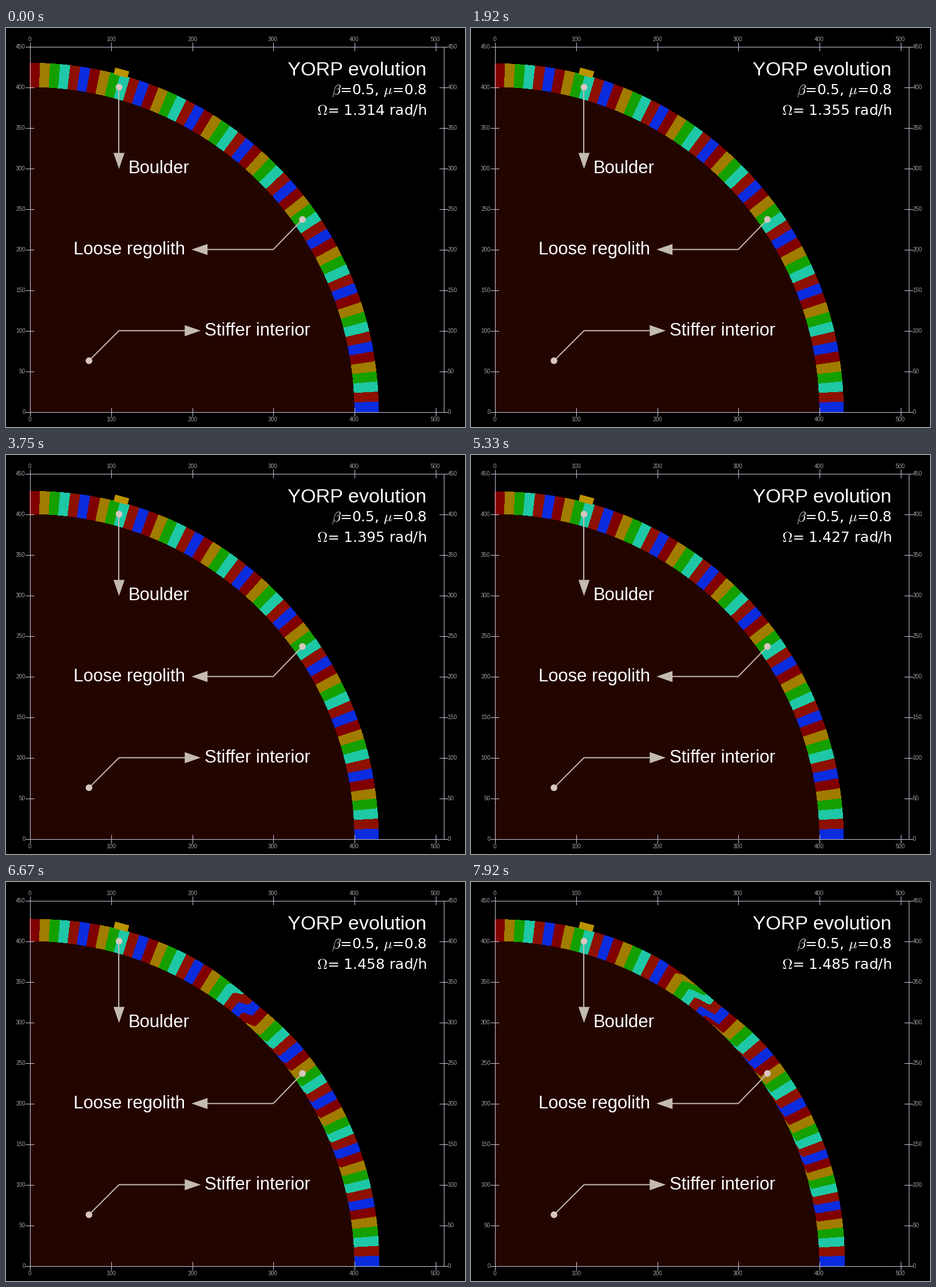
These frames come from a looping animation (802 px wide and 698 px high, 8000 ms). A matplotlib script:

```python
import numpy as np
import matplotlib.pyplot as plt
from matplotlib.animation import FuncAnimation
from matplotlib.collections import LineCollection

W, H, DPI = 802, 698, 64
FRAMES, LOOP = 96, 8000
X0, Y0, KX, KY = 41.5, 671.5, 1.418, 1.42
PT = 72 / DPI                      # points per pixel
R_IN, R_OUT, STRIPES = 400, 430, 54
SLIP_START = 66

PALETTE = np.array([(128, 0, 0), (160, 124, 0), (20, 160, 0),
                    (30, 200, 166), (141, 16, 0), (10, 44, 222)], np.uint8)
CORE = (35, 5, 0)
AXIS = "#c8c8dc"
POINTER = "#c3bbb2"
DOT = "#d8c6c0"

fig = plt.figure(figsize=(W / DPI, H / DPI), dpi=DPI, facecolor="black")
ax = fig.add_axes([0, 0, 1, 1])
ax.axis("off")


def to_px(x, y):
    return X0 + KX * x, Y0 - KY * y


def smooth(x):
    x = np.clip(x, 0, 1)
    return x * x * (3 - 2 * x)


# Polar coordinates of every pixel of the quarter disc
LEFT, RIGHT, TOP, BOTTOM = 41, 662, 50, 672
px, py = np.meshgrid(np.arange(LEFT, RIGHT) + 0.5, np.arange(TOP, BOTTOM) + 0.5)
gx, gy = (px - X0) / KX, (Y0 - py) / KY
radius = np.hypot(gx, gy)
base = np.zeros(radius.shape + (3,), np.uint8)
base[radius < R_IN] = CORE
ring = (radius >= R_IN) & (radius < R_OUT + 4)
r = radius[ring]
theta = np.clip(np.degrees(np.arctan2(gx[ring], gy[ring])), 0, 89.999)


def slip_at(n):
    """Downslope slip in degrees."""
    return 5.2 * (1 - np.exp(-max(0, n - SLIP_START) / 36))


def displacement(slip):
    head = 39.4 - 3 * slip
    x = np.clip((theta - head) / (44 - head), 0, 1.5)
    depth = (r - (424 - 35 * x ** 1.3)) / 14
    shear = 0.5 * (np.clip(depth, 0, 1) + smooth(depth)) * (theta > head)
    drag = np.clip(0.5 + (r - R_IN) / 4, 0, 1)
    decay = smooth((90 - theta) / (46.7 - 6.5 * slip))
    return slip * shear * drag * decay


def surface(n, slip):
    pole = 3 * n / (FRAMES - 1) * np.exp(-(theta / 14) ** 2)
    scar = 2.1 * slip * np.exp(-((theta - 40) / 5.5) ** 2 / 2)
    bulge = 0.85 * slip * np.exp(-((theta - 73) / 15) ** 2 / 2)
    return R_OUT - pole - scar + bulge


def picture(n):
    slip = slip_at(n)
    start = theta - displacement(slip)
    index = np.floor(start * STRIPES / 90).astype(int) % 6
    colors = PALETTE[index]
    colors[r > surface(n, slip)] = 0
    img = base.copy()
    img[ring] = colors
    return img


def text(x, y, s, size, color="white", ha="left", font="Liberation Sans"):
    return ax.text(x, y, s, fontsize=size * PT, color=color, ha=ha,
                   va="baseline", family=font, math_fontfamily="cm", zorder=6)


def pointer(points, label, label_pos):
    """Dot, bent line and arrowhead through points given in data units."""
    p = np.array([to_px(*q) for q in points])
    d = (p[-1] - p[-2]) / np.hypot(*(p[-1] - p[-2]))
    side = np.array([-d[1], d[0]])
    tip = p[-1] + d
    foot = tip - 28 * d
    line = np.vstack([p[:-1], foot])
    ax.plot(*line.T, color=POINTER, lw=2 * PT, zorder=4)
    ax.fill(*np.array([tip, foot + 9.7 * side, foot - 9.7 * side]).T,
            color=POINTER, lw=0, zorder=4)
    ax.add_patch(plt.Circle(p[0], 5.8, color=DOT, lw=0, zorder=5))
    text(*label_pos, label, 31)


def draw_axes():
    right, top = 764.5, 32.5
    segs = [[(X0, top), (right, top)], [(X0, Y0), (right, Y0)],
            [(X0, top), (X0, Y0)], [(right, top), (right, Y0)]]
    for v in range(0, 501, 100):
        x = np.floor(to_px(v, 0)[0]) + 0.5
        segs += [[(x, y - 7.5), (x, y + 7.5)] for y in (top, Y0)]
        for y in (23, 687.6):
            text(x, y, str(v), 10, "#a0a0a0", "center")
    for v in range(0, 451, 50):
        y = np.floor(to_px(0, v)[1]) + 0.5
        segs += [[(x - 7.5, y), (x + 7.5, y)] for x in (X0, right)]
        text(34, y + 3.6, str(v), 10, "#a0a0a0", "right")
        text(771.5, y + 3.6, str(v), 10, "#a0a0a0")
    ax.add_collection(LineCollection(segs, colors=AXIS, linewidths=PT, zorder=3))


def draw_boulder():
    a = np.radians([13.95, 16.3, 16.3, 13.95])
    rad = np.array([437, 437, 428.6, 428.6])
    ax.fill(*to_px(rad * np.sin(a), rad * np.cos(a)), color="#bc9400", lw=0, zorder=2)


image = ax.imshow(picture(0), extent=(LEFT, RIGHT, BOTTOM, TOP),
                  interpolation="nearest", aspect="auto", zorder=1)
draw_boulder()
draw_axes()
pointer([(110, 400), (110, 300)], "Boulder", (214, 254))
pointer([(336, 237), (300, 200), (200, 200)], "Loose regolith", (118, 396))
pointer([(73, 63), (110, 100), (210, 100)], "Stiffer interior", (347, 538))
text(735, 83, "YORP evolution", 34.2, ha="right")
text(735, 116, r"$\beta$=0.5, $\mu$=0.8", 25, ha="right", font="DejaVu Sans")
spin = text(735, 152, "", 25, ha="right", font="DejaVu Sans")
ax.set_xlim(0, W)
ax.set_ylim(H, 0)


def update(n):
    image.set_data(picture(n))
    spin.set_text(rf"$\Omega$= {1.314 + 0.0018 * n:.3f} rad/h")
    return image, spin


anim = FuncAnimation(fig, update, frames=FRAMES, interval=LOOP / FRAMES,
                     init_func=lambda: update(0), repeat=True, repeat_delay=0)
plt.show()
```
